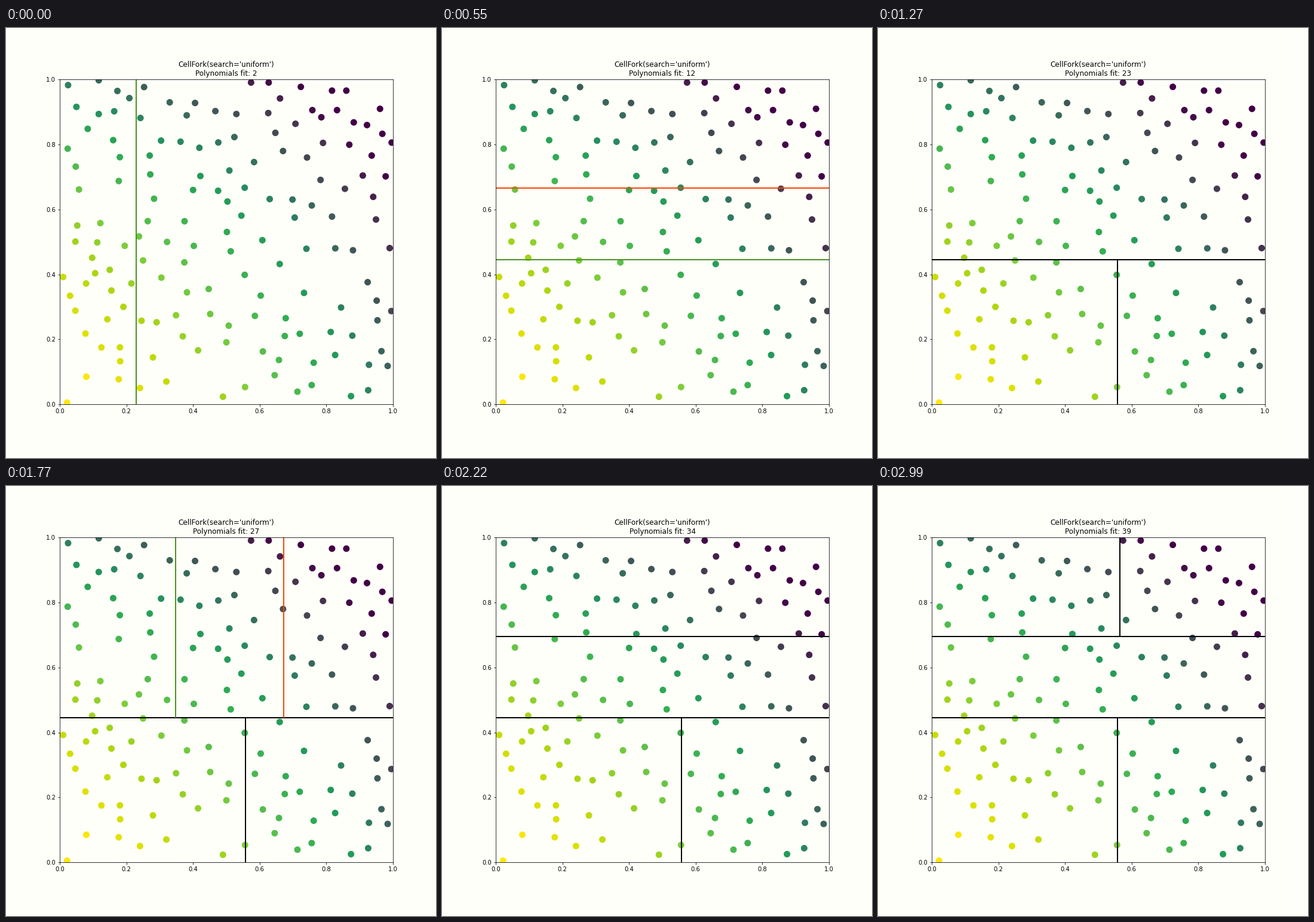
Recreate the animation shown at these times as a matplotlib script. Size 720x720 px, loop 3.04 s.

```python
import random

import numpy as np
import matplotlib.pyplot as plt
from matplotlib.animation import FuncAnimation
from matplotlib.colors import LinearSegmentedColormap

TICK = 10  # ms
LOOP = 3040
STEP = 55.4  # ms per search step
PAPER = "#fffffa"
BEST, TRIAL, SPLIT = "#4a941c", "#ff4500", "black"

CMAP = LinearSegmentedColormap.from_list("leaf", [
    "#420045", "#46304c", "#454550", "#3d6058", "#2e7d62", "#22985a",
    "#30ac52", "#50bb4e", "#7ccd3a", "#acd512", "#d8e000", "#ffe810"])

ANCHORS = [
    (.025, .983), (.117, .998), (.173, .965), (.050, .916), (.117, .894),
    (.209, .943), (.253, .977), (.330, .930), (.406, .928), (.381, .890),
    (.467, .903), (.530, .894), (.574, .991), (.627, .991), (.661, .942),
    (.758, .906), (.817, .966), (.860, .966), (.832, .906), (.785, .884),
    (.961, .910), (.922, .860), (.968, .833), (.996, .806), (.936, .766),
    (.978, .702), (.790, .805), (.647, .836), (.670, .780), (.742, .760),
    (.583, .746), (.524, .823), (.419, .790), (.304, .812), (.270, .766),
    (.048, .732), (.422, .703), (.509, .720), (.400, .660), (.283, .633),
    (.555, .667), (.545, .581), (.630, .632), (.705, .575), (.817, .578),
    (.949, .569), (.990, .481), (.264, .564), (.322, .500), (.195, .488),
    (.047, .501), (.513, .471), (.010, .392), (.079, .372), (.150, .414),
    (.215, .372), (.250, .443), (.305, .390), (.374, .437), (.447, .355),
    (.191, .300), (.660, .432), (.733, .343), (.678, .265), (.924, .376),
    (.995, .287), (.984, .118), (.874, .025), (.762, .128), (.556, .053),
    (.177, .077), (.022, .005), (.415, .166), (.320, .070)]


def fill_gaps(points, total, tries=6, seed=7):
    """Add seeded dots, each the loneliest of a few random tries."""
    rng = random.Random(seed)
    points = list(points)
    while len(points) < total:
        tests = [(rng.uniform(.02, .98), rng.uniform(.02, .98))
                 for _ in range(tries)]
        points.append(max(tests, key=lambda c: min(
            (c[0] - x) ** 2 + (c[1] - y) ** 2 for x, y in points)))
    return np.array(points)


def height(x, y):
    return np.clip(1.06 - .5 * x - .45 * y - .25 * (x**4 + y**4), 0, 1)


def cut(box, axis, pos):
    """Line across box (x0, x1, y0, y1) at pos on the given axis."""
    x0, x1, y0, y1 = box
    return ([pos, pos], [y0, y1]) if axis == "x" else ([x0, x1], [pos, pos])


LOW, HIGH = .4458, .6956  # the two horizontal splits

# box, data range, candidate indices and improving ones per axis, rest steps
SEARCHES = [
    ((0, 1, 0, 1),
     {"x": (.0098, .996, range(2, 8), (2, 3, 4, 5)),
      "y": (.0040, .998, range(2, 9), (3, 4))}, 1),
    ((0, 1, 0, LOW),
     {"x": (.0098, .995, range(3, 7), (3, 4, 5)),
      "y": (.0040, .443, range(3, 8), ())}, 6),
    ((0, 1, LOW, 1),
     {"x": (.0233, .996, range(3, 8), (3,)),
      "y": (.4540, .998, range(2, 8), (3, 4))}, 3),
    ((0, 1, HIGH, 1),
     {"x": (.0251, .996, range(4, 6), (4, 5)),
      "y": (.7004, .998, range(4, 7), ())}, 7),
]


def grow_tree():
    """List every step as (fits, done splits, best line, trial line)."""
    steps, done, fits = [], [], 1
    for box, axes, rest in SEARCHES:
        best = None
        for axis, (lo, hi, ids, better) in axes.items():
            for i in ids:
                fits += 1
                trial = cut(box, axis, lo + (hi - lo) * i / 9)
                if i in better:
                    best, trial = trial, None
                steps.append((fits, tuple(done), best, trial))
        done.append(best)
        steps += [(fits, tuple(done), None, None)] * rest
    return steps


STEPS = grow_tree()
STARTS = [round(k * STEP / TICK) for k in range(len(STEPS))]

fig = plt.figure(figsize=(10, 10), dpi=72, facecolor=PAPER)
ax = fig.add_axes([.125, .125, .775, .755], facecolor=PAPER)
ax.set(xlim=(0, 1), ylim=(0, 1))
title = ax.set_title("", fontsize=12)

x, y = fill_gaps(ANCHORS, 150).T
ax.scatter(x, y, s=100, c=height(x, y), cmap=CMAP, vmin=0, vmax=1)


def new_line(color):
    return ax.plot([], [], color=color, lw=2, solid_capstyle="butt")[0]


split_lines = [new_line(SPLIT) for _ in SEARCHES]
best_line, trial_line = new_line(BEST), new_line(TRIAL)


def place(line, data):
    line.set_data(*(data or ([], [])))


def update(n):
    k = np.searchsorted(STARTS, n, side="right") - 1
    fits, done, best, trial = STEPS[k]
    title.set_text(f"CellFork(search='uniform')\nPolynomials fit: {fits}")
    for i, line in enumerate(split_lines):
        place(line, done[i] if i < len(done) else None)
    place(best_line, best)
    place(trial_line, trial)
    return [title, *split_lines, best_line, trial_line]


anim = FuncAnimation(fig, update, frames=LOOP // TICK, interval=TICK,
                     repeat=True, repeat_delay=0, blit=False)
plt.show()
```
